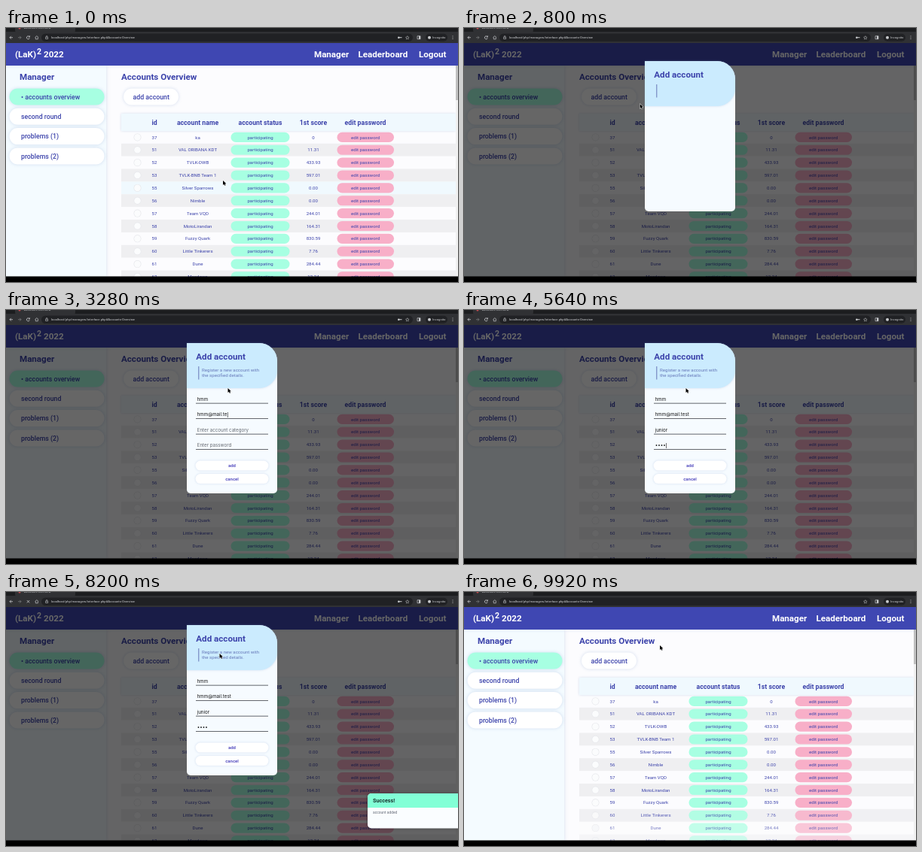
Recreate the animation shown at these times as an HTML page with a canvas. Size 600 by 338 pixels, loop 9.96 s.

```html
<!DOCTYPE html>
<html lang="en">
<head>
<meta charset="utf-8">
<title>Accounts Overview</title>
<style>
html, body { margin: 0; width: 100%; height: 100%; overflow: hidden; background: #000; }
canvas { display: block; width: 600px; height: 338px; }
</style>
</head>
<body>
<canvas></canvas>
<script>
const LOOP = 9960, RELOAD = 8440;
const canvas = document.querySelector('canvas');
const ctx = canvas.getContext('2d');
const dpr = window.devicePixelRatio || 1;
canvas.width = 600 * dpr;
canvas.height = 338 * dpr;

const INDIGO = '#3c43ab', HEADER = '#3f47b2', MINT = '#a7ffe2', PINK = '#f8afc8';
const UI = 'Roboto, sans-serif';
const TITLE = `bold 11.6px ${UI}`, MENU = `500 8.75px ${UI}`, HEAD = `bold 8.7px ${UI}`;
const CELL = `6.1px ${UI}`, BUTTON = `500 6px ${UI}`, CHROME = `4.2px ${UI}`;
const FIELD = '6.2px Inter, sans-serif';

const rows = [
  [37, 'ka', '0'], [51, 'VAL ORIBANA KDT', '11.31'], [52, 'TVLK-DWB', '433.93'],
  [53, 'TVLK-BNB Team 1', '597.01'], [55, 'Silver Sparrows', '0.00'], [56, 'Nimble', '0.00'],
  [57, 'Team VQD', '244.01'], [58, 'MotoLirandan', '164.31'], [59, 'Fuzzy Quark', '830.59'],
  [60, 'Little Tinkerers', '7.76'], [61, 'Dune', '284.44'], [62, 'Meadows', '12.24']
];
const fields = [
  { hint: 'Enter account name', value: 'hmm', start: 1600, step: 120 },
  { hint: 'Enter account email', value: 'hmm@mail.test', start: 2240, step: 95 },
  { hint: 'Enter account category', value: 'junior', start: 3900, step: 110 },
  { hint: 'Enter password', value: '••••', start: 5000, step: 140 }
];
// Pointer stops: time, x, y
const stops = [
  [0, 288, 203], [80, 288, 203], [400, 196, 91], [620, 198, 93], [800, 233.5, 101], [1080, 294.5, 104],
  [6100, 294.5, 104], [6550, 301, 206], [7100, 301, 206], [7700, 284, 84], [8200, 283.5, 82],
  [8700, 290, 78], [9280, 296, 73], [9560, 296, 73], [9920, 260, 71], [LOOP, 260, 71]
];

const clamp = v => Math.max(0, Math.min(1, v));
const ramp = (t, start, length) => clamp((t - start) / length);
const ease = p => p * p * (3 - 2 * p);

function text(s, x, y, font, color, align = 'left') {
  ctx.font = font;
  ctx.fillStyle = color;
  ctx.textAlign = align;
  ctx.fillText(s, x, y);
}

function box(x, y, w, h, color, radius = 0, glow = 0, glowColor = 'rgba(120,150,200,.3)') {
  ctx.shadowBlur = glow * dpr;
  ctx.shadowColor = glowColor;
  ctx.fillStyle = color;
  ctx.beginPath();
  ctx.roundRect(x, y, w, h, radius);
  ctx.fill();
  ctx.shadowBlur = 0;
}

function disc(x, y, r, color) {
  ctx.fillStyle = color;
  ctx.beginPath();
  ctx.arc(x, y, r, 0, 7);
  ctx.fill();
}

function stroke(path, color, width = 0.8) {
  ctx.strokeStyle = color;
  ctx.lineWidth = width;
  ctx.stroke(new Path2D(path));
}

function faded(alpha, draw) {
  if (alpha <= 0) return;
  ctx.save();
  ctx.globalAlpha *= alpha;
  draw();
  ctx.restore();
}

function pointerAt(t) {
  const i = stops.findIndex((s, n) => n && t <= s[0]);
  const [a, b] = [stops[i - 1], stops[i]];
  const p = ease(ramp(t, a[0], b[0] - a[0]));
  return [a[1] + (b[1] - a[1]) * p, a[2] + (b[2] - a[2]) * p];
}

function drawChrome(t) {
  const ink = '#c8cacd';
  box(0, 0, 600, 6, '#1c1d1f');
  box(12, -4, 80, 10, '#303134', 3);
  disc(18, 0, 1.5, '#c94b50');
  text('Accounts Overview', 24, 1.2, CHROME, ink);
  box(0, 5, 600, 15, '#303134');
  box(47, 7.5, 493, 10.5, '#202124', 5.2);
  stroke('M9 12.7H5M6.8 10.8L5 12.7l1.8 1.9', ink);
  stroke('M16 12.7h4M18.2 10.8l1.8 1.9-1.8 1.9', '#77797c');
  if (t > 7640 && t < RELOAD + 600) stroke('M27.8 11l3.4 3.4M31.2 11l-3.4 3.4', ink);
  else stroke('M31 11.6A2 2 0 1 0 31.3 13.4M31.4 10.2v1.8h-1.8', ink);
  stroke('M38.5 12.6l2.3-2 2.3 2M39.3 12.4v2.4h3v-2.4', ink, 0.7);
  stroke('M52.6 12.3h3v2.2h-3zM53.2 12.2v-.8a.9.9 0 0 1 1.8 0v.8', ink, 0.6);
  text('localhost/php/managers/interface.php#Accounts-Overview', 60, 14.2, CHROME, '#d5d7da');
  if (t < RELOAD) {
    disc(521.3, 12.7, 1.3, ink);
    box(522, 12.2, 3.5, 1, ink);
  }
  stroke('M532.8 10.6l.7 1.5 1.6.2-1.2 1.1.3 1.6-1.4-.8-1.4.8.3-1.6-1.2-1.1 1.6-.2z', ink, 0.5);
  stroke('M546 10.7h4v4h-4z', ink, 0.7);
  box(548, 10.7, 2, 4, ink);
  box(557, 7.8, 29, 10, '#202124', 5);
  disc(562, 12.7, 2, ink);
  text('Incognito', 566, 14.2, CHROME, ink);
  for (const y of [10.8, 12.7, 14.6]) disc(593, y, 0.5, ink);
}

function drawSidebar(alpha) {
  box(0, 50, 133, 281, '#f4fbff', 0, 5);
  text('Manager', 18, 69.3, TITLE, INDIGO);
  ['• accounts overview', 'second round', 'problems (1)', 'problems (2)'].forEach((label, i) =>
    faded(alpha, () => {
      const y = 91.5 + 26.3 * i;
      box(4.5, y - 11, 126, 22, i ? '#fff' : MINT, 11, 4);
      text(label, 20, y + 3.1, MENU, INDIGO);
    }));
}

function drawRow([id, name, score], i, hovered) {
  const y = 145.4 + 16.87 * i, base = y + 2.1;
  const shade = hovered ? '#f0f9fe' : i % 2 ? '#efeff1' : '#fcfcfe';
  box(153, y - 8.43, 444, 16.87, shade);
  disc(174.5, y, 5, '#e7e8ec');
  disc(174.5, y, 4.3, '#fbfcfd');
  text(id, 197, base, CELL, INDIGO, 'center');
  text(name, 254.5, base, CELL, INDIGO, 'center');
  box(298.5, y - 6.6, 78, 13.2, MINT, 6.6);
  text('participating', 337.5, base, CELL, INDIGO, 'center');
  text(score, 408, base, CELL, INDIGO, 'center');
  box(439.5, y - 6.6, 75.5, 13.2, PINK, 6.6);
  text('edit password', 477, base, CELL, INDIGO, 'center');
}

function drawPage(t, pointer) {
  const fresh = t >= RELOAD;
  const enter = (start, length) => fresh ? ramp(t, start, length) : 1;
  box(0, 20, 600, 311, '#fcfcfe');
  drawSidebar(enter(9260, 300));
  text('Accounts Overview', 153, 69.3, TITLE, INDIGO);
  box(156, 80.5, 73, 22, '#fff', 11, 4);
  text('add account', 192.7, 94.6, MENU, INDIGO, 'center');

  rows.forEach((row, i) => {
    const hovered = t < 500 && Math.abs(pointer[1] + 2 - 145.4 - 16.87 * i) < 8.4;
    faded(enter(9350 + 40 * i, 250), () => drawRow(row, i, hovered));
  });
  faded(enter(9290, 250), () => {
    box(153, 114, 444, 23, '#f0f9fe', 0, 3);
    [['id', 197], ['account name', 254.5], ['account status', 337.5], ['1st score', 408], ['edit password', 477]]
      .forEach(([label, x]) => text(label, x, 128.8, HEAD, INDIGO, 'center'));
  });

  box(597, 50, 3, 281, '#f1f1f1');
  box(597, 50, 3, 46, '#c1c1c1');
  box(0, 20, 600, 30, HEADER, 0, 4);
  text('(LaK)', 12, 39.4, TITLE, '#fff');
  text('2', 41, 35.2, `bold 10.5px ${UI}`, '#fff');
  text('2022', 50, 39.4, TITLE, '#fff');
  text('Manager', 409, 39.4, TITLE, '#fff');
  text('Leaderboard', 467.5, 39.4, TITLE, '#fff');
  text('Logout', 548, 39.4, TITLE, '#fff');
}

function drawField({ hint, value, start, step }, i, t) {
  const y = 120.8 + 20.5 * i;
  const count = Math.max(0, Math.min(value.length, Math.floor((t - start) / step) + 1));
  const typed = value.slice(0, count);
  text(typed || hint, 253.7, y, FIELD, typed ? '#151515' : '#666a70');
  box(252, y + 3, 96, 0.8, '#33363c');

  const end = i < 3 ? fields[i + 1].start - 250 : 6900;
  const begin = i ? start - 250 : 1300;
  const lastKey = start + (count - 1) * step;
  if (t >= begin && t < end && (!count || (t - lastKey) % 1060 < 530)) {
    const x = typed ? 254.2 + ctx.measureText(typed).width : 253.2;
    box(x, y - 5.3, 0.6, 7, '#111');
  }
}

function drawModal(t) {
  faded(ramp(t, 480, 180), () => box(0, 20, 600, 311, 'rgba(0,0,0,.6)'));
  faded(ramp(t, 520, 180), () => {
    ctx.translate(0, 14 * (1 - ease(ramp(t, 520, 200))));
    box(240, 44, 120, 200, '#f6fbff', [0, 24, 5, 5]);
    box(240, 44, 120, 60, '#cbebfe', [0, 24, 24, 0], 3);
    text('Add account', 252.3, 65.8, TITLE, INDIGO);
    box(255.3, 75, 1, 17.5, '#6677b5');
    faded(ramp(t, 840, 200), () => {
      const font = `6.1px ${UI}`;
      text('Register a new account with', 260, 82, font, '#6577b8');
      text('the specified details.', 260, 89.3, font, '#6577b8');
    });
    faded(ramp(t, 900, 250), () => {
      fields.forEach((field, i) => drawField(field, i, t));
      [['add', 207.1], ['cancel', 224.6]].forEach(([label, y]) => {
        box(251.5, y - 6.5, 97, 13, '#fff', 6.5, 3);
        text(label, 300, y + 2, BUTTON, '#4038b8', 'center');
      });
    });
  });
}

function drawToast(t) {
  if (t < 7440) return;
  const x = 600 - 120 * ease(ramp(t, 7440, 300));
  box(x, 268, 126, 46.5, '#fafdff', 5, 4, 'rgba(0,0,0,.3)');
  box(x, 268, 126, 19, '#82ffd6', [5, 0, 0, 0]);
  text('Success!', x + 7, 280.2, `bold 7.2px ${UI}`, '#17332e');
  text('account added', x + 7, 294.8, `4.9px ${UI}`, '#666b78');
}

function drawLoader(t) {
  const veil = 1 - ramp(t, 9190, 400);
  faded(veil, () => box(0, 20, 600, 311, '#fff'));
  faded(clamp(veil * 1.4), () => {
    for (let k = 0; k < 5; k++) {
      const v = Math.max(0, Math.cos(2 * Math.PI * ((t - 9280) / 1000 - k * 0.12)));
      faded(v, () => disc(242.7 + 31.5 * k, 172 - 6 * v, 6.2 + 2.4 * v, '#2e3458'));
    }
  });
}

function drawPointer([x, y]) {
  const arrow = new Path2D(`M${x} ${y}v6l1.4-1.2 1 2 1.1-.5-.9-2h1.8z`);
  ctx.lineWidth = 1;
  ctx.strokeStyle = '#fff';
  ctx.stroke(arrow);
  ctx.fillStyle = '#000';
  ctx.fill(arrow);
}

function frame(now) {
  const t = now % LOOP, pointer = pointerAt(t);
  ctx.setTransform(dpr, 0, 0, dpr, 0, 0);
  drawPage(t, pointer);
  if (t < RELOAD) {
    drawModal(t);
    drawToast(t);
  } else {
    drawLoader(t);
  }
  drawChrome(t);
  box(0, 330.5, 600, 8, '#000');
  drawPointer(pointer);
  requestAnimationFrame(frame);
}
requestAnimationFrame(frame);
</script>
</body>
</html>
```
